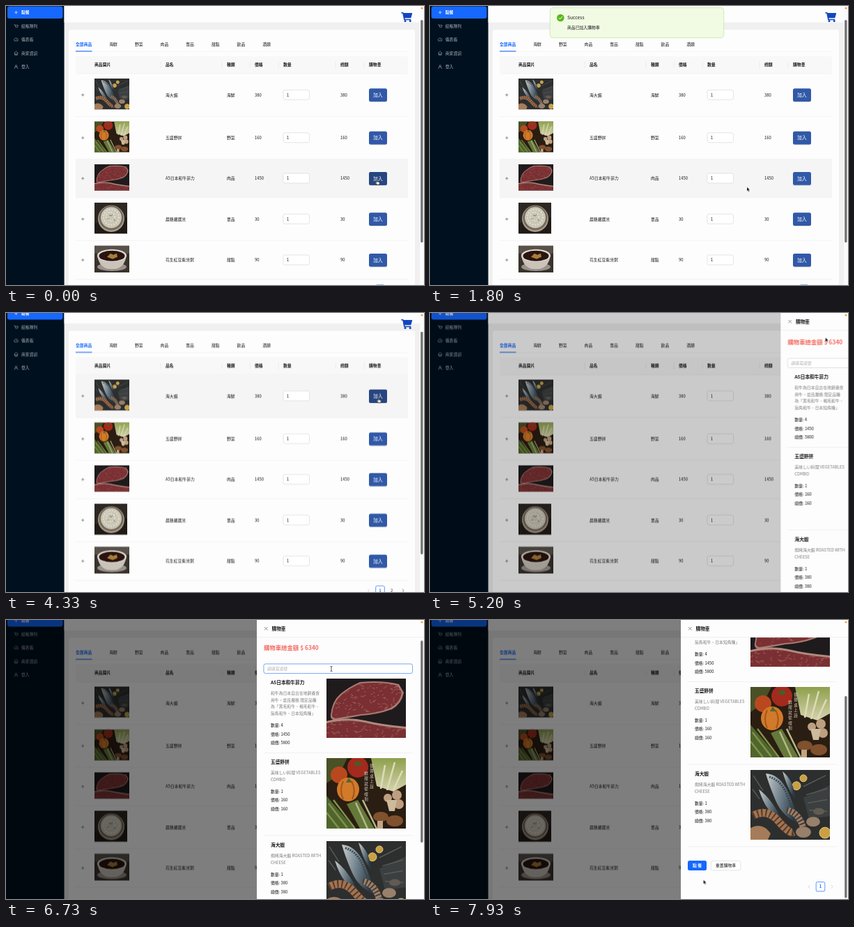
An HTML page that plays this animation: 600x400 px, repeating every 8000 ms.

```html
<!DOCTYPE html>
<html lang="zh-Hant">
<head>
<meta charset="utf-8">
<title>點餐</title>
<style>
html, body { margin: 0; width: 100%; height: 100%; overflow: hidden; background: #f0f0f0; }
svg { display: block; }
#stage { width: 100vw; height: 100vh; }
text { font-family: 'Noto Sans CJK TC', 'Noto Sans CJK JP', 'Noto Sans CJK', 'Open Sans', sans-serif; }
.soft { filter: blur(.6px); }
.move { animation: 8s linear infinite; }
.flip { animation: 8s step-end infinite; opacity: 0; }

.page { animation-name: page; }
@keyframes page { 0%, 24.5% { transform: none; } 28%, 100% { transform: translateY(-8.5px); } }
.pageThumb { animation-name: pageThumb; }
@keyframes pageThumb { 0%, 24.5% { transform: none; } 28%, 100% { transform: translateY(6.5px); } }

.row1 { animation-name: row1; }
@keyframes row1 { 0% { opacity: 0; } 49.5% { opacity: 1; } 59%, 100% { opacity: 0; } }
.row2 { animation-name: row2; }
@keyframes row2 { 0% { opacity: 0; } 36.5% { opacity: 1; } 49.5%, 100% { opacity: 0; } }
.row3 { animation-name: row3; }
@keyframes row3 { 0% { opacity: 1; } 26% { opacity: 0; } 33.5% { opacity: 1; } 36.5%, 100% { opacity: 0; } }
.row4 { animation-name: row4; }
@keyframes row4 { 0% { opacity: 0; } 26% { opacity: 1; } 33.5%, 100% { opacity: 0; } }
.press1 { animation-name: press1; }
@keyframes press1 { 0% { opacity: 0; } 50.5% { opacity: 1; } 57.5%, 100% { opacity: 0; } }
.press2 { animation-name: press2; }
@keyframes press2 { 0% { opacity: 0; } 37.5% { opacity: 1; } 48%, 100% { opacity: 0; } }
.press3 { animation-name: press3; }
@keyframes press3 { 0% { opacity: 1; } 17.5%, 100% { opacity: 0; } }

.notice { animation-name: notice; }
@keyframes notice {
  0%, 11.7%, 27%, 40%, 51.5%, 56%, 64%, 100% { opacity: 0; transform: translateY(-14px); }
  13%, 26%, 41.5%, 50.5%, 57.5%, 63% { opacity: 1; transform: none; }
}
.mask { animation-name: mask; }
@keyframes mask { 0%, 64% { opacity: 0; } 66.5%, 100% { opacity: .5; } }
.drawer { animation-name: drawer; }
@keyframes drawer {
  0%, 64% { transform: translateX(252px); animation-timing-function: ease-out; }
  67.5%, 100% { transform: none; }
}
.cart { animation-name: cart; }
@keyframes cart {
  0%, 76% { transform: none; }
  78.5%, 88% { transform: translateY(-2px); animation-timing-function: ease-in-out; }
  95.5%, 100% { transform: translateY(-104px); }
}
.cartThumb { animation-name: cartThumb; }
@keyframes cartThumb {
  0%, 76% { transform: none; }
  78.5%, 88% { transform: translateY(1.5px); animation-timing-function: ease-in-out; }
  95.5%, 100% { transform: translateY(81px); }
}
.focus { animation-name: focus; }
@keyframes focus { 0% { opacity: 0; } 79.5%, 100% { opacity: 1; } }

.pointer { animation-name: pointer; }
@keyframes pointer {
  0%, 16% { transform: translate(532.5px, 249px); }
  18.5% { transform: translate(500px, 257px); }
  21.5%, 24% { transform: translate(455px, 259.5px); }
  28% { transform: translate(492px, 284px); }
  32.5% { transform: translate(520px, 256px); }
  35% { transform: translate(530px, 218px); }
  38%, 47% { transform: translate(532.5px, 181px); }
  51%, 56% { transform: translate(534.5px, 121.5px); }
  62%, 64.5% { transform: translate(573px, 14px); }
  70%, 72% { transform: translate(515px, 241px); }
  77.5%, 89% { transform: translate(467px, 70px); }
  94% { transform: translate(418px, 320px); }
  97.5%, 100% { transform: translate(392.5px, 372.5px); }
}
.hand { animation-name: hand; }
@keyframes hand {
  0%, 37.5%, 50.5%, 61% { opacity: 1; }
  17.5%, 48%, 57.5%, 65%, 100% { opacity: 0; }
}
.beam { animation-name: beam; }
@keyframes beam { 0%, 89.5%, 100% { opacity: 0; } 77% { opacity: 1; } }
.arrow { animation-name: arrow; }
@keyframes arrow {
  0%, 37.5%, 50.5%, 61%, 77% { opacity: 0; }
  17.5%, 48%, 57.5%, 65%, 89.5%, 100% { opacity: 1; }
}
</style>
</head>
<body>
<svg id="stage" viewBox="0 0 600 400" preserveAspectRatio="none">
<defs>
  <clipPath id="bodyClip"><rect x="360" y="25" width="240" height="375"/></clipPath>
  <clipPath id="steakClip">
    <path d="M8 51Q10 33 22 23T49 7Q80 4 102 10L108 20Q106 34 92 42Q72 50 50 51L13 57Q7 56 8 51z"/>
    <path d="M0 64Q30 57 55 63T114 72V85H0z"/>
  </clipPath>
  <linearGradient id="fish" x2="1" y2=".3">
    <stop stop-color="#c9cdcb"/><stop offset=".5" stop-color="#75858f"/><stop offset="1" stop-color="#2b3a45"/>
  </linearGradient>
  <linearGradient id="cabbage" x2="0" y2="1">
    <stop stop-color="#8da04c"/><stop offset="1" stop-color="#d6d3ae"/>
  </linearGradient>

  <symbol id="seafood" viewBox="0 0 114 101" preserveAspectRatio="none">
    <rect width="114" height="101" fill="#2d2e2e"/>
    <g class="soft">
      <path d="M76 40l38-18v45l-30 4z" fill="#3c3f40"/>
      <path d="M76 24l32-16M80 36l30-9M82 48l28-5M84 58l26 2M4 8l14 22M3 28l10 14" stroke="#565b5b" stroke-width="1.5"/>
      <g fill="#c9a043" stroke="#e0c87d"><circle cx="66" cy="23" r="6"/><circle cx="76" cy="12" r="5"/><circle cx="107" cy="91" r="8"/></g>
      <g fill="url(#fish)">
        <path d="M22 5Q42 6 54 32T70 78Q46 68 36 44T22 5z"/>
        <path d="M46 2Q63 16 64 42Q54 30 46 2z"/>
        <path d="M12 28Q31 42 46 74Q23 64 12 28z"/>
      </g>
      <path d="M27 10Q46 16 54 40T66 70" fill="none" stroke="#384853" stroke-width="3" stroke-dasharray="2 1.500"/>
      <path d="M4 66Q24 55 40 74T62 90" fill="none" stroke="#a17450" stroke-width="11"/>
      <path d="M4 66Q24 55 40 74T62 90" fill="none" stroke="#58392a" stroke-width="11" stroke-dasharray="2 4"/>
      <path d="M52 58Q70 62 76 85" fill="none" stroke="#9b8069" stroke-width="9"/>
      <path d="M52 58Q70 62 76 85" fill="none" stroke="#493a34" stroke-width="9" stroke-dasharray="2 3"/>
      <path d="M0 84q17-9 29 8l-4 9H0z" fill="#a57c59"/>
      <g fill="#98806a"><ellipse cx="76" cy="90" rx="11" ry="8"/><ellipse cx="90" cy="75" rx="10" ry="7"/><ellipse cx="98" cy="60" rx="8" ry="5" fill="#625a51"/></g>
    </g>
  </symbol>

  <symbol id="greens" viewBox="0 0 114 101" preserveAspectRatio="none">
    <rect width="114" height="101" fill="#2a1d12"/>
    <g class="soft">
      <path d="M0 0h30L18 24 0 36z" fill="#4a5126"/>
      <path d="M64 0h50v38L96 48 72 40z" fill="url(#cabbage)"/>
      <path d="M78 44l6-34M87 46l11-40M96 46l13-28" stroke="#dddbb9" stroke-width="2.500"/>
      <circle cx="45" cy="13" r="15" fill="#a32a1c"/><path d="M38 8l8-4 6 5-7 3z" fill="#4a5c29"/>
      <circle cx="18" cy="24" r="12" fill="#b9481f"/>
      <ellipse cx="31" cy="45" rx="16" ry="17" fill="#d17a29"/>
      <path d="M24 33q-6 13 0 26M36 33q7 13 1 26" fill="none" stroke="#a3551e" stroke-width="2"/>
      <path d="M28 35l4-7 5 7z" fill="#58652f"/>
      <path d="M0 54l40 47H0z" fill="#50652d"/>
      <path d="M3 65l27 35M0 78l18 23M10 60l31 41" stroke="#7f9349" stroke-width="2.500"/>
      <path d="M45 60l24 41H48L29 66z" fill="#64793a"/>
      <path d="M52 60l20 41M42 64l17 37" stroke="#b6b78a" stroke-width="2.500"/>
      <g fill="#bd9f80"><circle cx="88" cy="57" r="6"/><circle cx="101" cy="53" r="7"/><circle cx="104" cy="66" r="7"/><path d="M86 60h15l-3 16h-8z" fill="#cdb99c"/></g>
      <g fill="#80512f"><ellipse cx="78" cy="84" rx="11" ry="7"/><ellipse cx="98" cy="90" rx="12" ry="8"/><path d="M73 90h8v11h-8z" fill="#c2a480"/></g>
    </g>
  </symbol>

  <symbol id="beef" viewBox="0 0 114 85" preserveAspectRatio="none">
    <rect width="114" height="85" fill="#1f1b1d"/>
    <g class="soft">
      <path d="M6 52Q8 32 20 22T48 5Q80 2 104 8L111 20Q108 36 94 44Q72 52 50 53L12 60Q5 58 6 52z" fill="#a97a72"/>
      <path d="M0 61Q30 54 55 60T114 69V85H0z" fill="#b08a80"/>
    </g>
    <g clip-path="url(#steakClip)">
      <rect width="114" height="85" fill="#7a3032"/>
      <path id="marbling" fill="none" stroke="#b0716c" stroke-width=".7"/>
    </g>
  </symbol>

  <symbol id="rice" viewBox="0 0 47 44.5" preserveAspectRatio="none">
    <rect width="47" height="44.5" fill="#2c2722"/>
    <path d="M0 30l47-9v23.5H0z" fill="#201b17"/>
    <g class="soft">
      <circle cx="24" cy="23" r="19" fill="#a79c8b"/>
      <circle cx="24" cy="22" r="17.5" fill="#75685a"/>
      <circle cx="24" cy="21.5" r="15" fill="#c9c6b6"/>
      <g fill="none" stroke="#e3e0d2" stroke-width="2" stroke-dasharray="2 2"><circle cx="24" cy="21" r="11"/><circle cx="23" cy="20" r="6"/></g>
      <path d="M21 18l3 1 2-2M18 24l3-1M27 24l3 2" stroke="#89865f" fill="none"/>
    </g>
  </symbol>

  <symbol id="soup" viewBox="0 0 50 38" preserveAspectRatio="none">
    <rect width="50" height="38" fill="#39322d"/>
    <g class="soft">
      <path d="M0 0h50v11H0z" fill="#57514a"/>
      <ellipse cx="25" cy="30" rx="21" ry="6" fill="#98918a"/>
      <path d="M4 14h42q-3 17-16 19H20Q7 31 4 14z" fill="#c9c3ba"/>
      <ellipse cx="25" cy="14" rx="21" ry="9" fill="#ddd8cf"/>
      <ellipse cx="25" cy="14.5" rx="18.5" ry="7.5" fill="#29140f"/>
      <path d="M18 16l5-5 4 2 5-2 1 5-7 3z" fill="#a97d3a"/>
    </g>
  </symbol>
</defs>
</svg>
<script>
const EM = 5.85, SIDE = 83.57, BLUE = '#1668ff', INK = '#181818';

const text = (x, y, str, { size = EM, fill = INK, weight = 500, extra = '' } = {}) =>
  `<text x="${x}" y="${y + size * .37}" font-size="${size}" fill="${fill}" font-weight="${weight}" ${extra}>${str}</text>`;
const rect = (x, y, w, h, fill, extra = '') =>
  `<rect x="${x}" y="${y}" width="${w}" height="${h}" fill="${fill}" ${extra}/>`;
const line = (d, stroke, width = .6) =>
  `<path d="${d}" fill="none" stroke="${stroke}" stroke-width="${width}"/>`;
const group = (cls, ...parts) => `<g class="${cls}">${parts.join('')}</g>`;
const photo = (id, x, y, w, h) => `<use href="#${id}" x="${x}" y="${y}" width="${w}" height="${h}"/>`;
const middle = 'text-anchor="middle"';

// Short random veins of fat, the same on every load.
function marbling() {
  let seed = 7;
  const random = span => (seed = seed * 16807 % 2147483647) / 2147483647 * span;
  return Array.from({ length: 260 }, () =>
    `M${random(114)} ${random(85)}q${random(3)} ${random(4) - 2} ${random(5)} ${random(5) - 3}`).join('');
}

function sidebar() {
  const icons = ['M-2.4 0h4.8M0-2.4v4.8',
    'M-3-2h1.2l1 3.4h3l.7-2.5h-4.4M-.5 2.6h.4M1.8 2.6h.4',
    'M-2.5 1.8a2.8 2.8 0 1 1 5 0zM0 .5l1-1.4',
    'M-3 0l3-2.7L3 0M-2-.6v3.1h4v-3.1M-.5 2.5v-1.6h1v1.6',
    'M-1.3-1.2a1.3 1.3 0 1 0 2.6 0a1.3 1.3 0 1 0-2.6 0M-2.5 2.8q0-2.6 2.5-2.6t2.5 2.6'];
  return rect(2, .5, 79.5, 17.5, BLUE, 'rx="3"') +
    ['點餐', '結帳隊列', '儀表板', '商家資訊', '登入'].map((label, i) => {
      const y = 9.2 + i * 19.5, fill = i ? '#a9b0b7' : '#fff';
      return `<g transform="translate(14.5 ${y})">${line(icons[i], fill)}</g>` +
        text(22, y, label, { fill, weight: i ? 400 : 700 });
    }).join('');
}

function pager(y, xs, hasNext) {
  const [prev, first, second, next] = xs;
  return line(`M${prev + 1.3} ${y - 2.2}l-2.4 2.2 2.4 2.2`, '#bbb') +
    rect(first - 6.3, y - 6.7, 12.6, 13.4, '#fff', `rx="2" stroke="${BLUE}" stroke-width=".7"`) +
    text(first, y, 1, { fill: BLUE, weight: 700, extra: middle }) +
    (hasNext ? text(second, y, 2, { extra: middle }) : '') +
    line(`M${next - 1.2} ${y - 2.2}l2.4 2.2-2.4 2.2`, hasNext ? '#333' : '#bbb');
}

function tableRow([id, name, kind, price, top, height, y, w], i) {
  const button = fill => rect(521, y - 9.3, 26, 18.8, fill, 'rx="2.5"');
  return (i < 4 ? rect(100, top, 477, height, '#f5f5f5', `class="flip row${i + 1}"`) : '') +
    line(`M100 ${top + height}H577`, '#ebebeb') +
    line(`M108 ${y}h4.4M110.2 ${y - 2.2}v4.4`, '#555') +
    photo(id, 127, top + 7, w, height - 17) +
    text(229, y, name) + text(317, y, kind) + text(357, y, price) +
    rect(398, y - 7.2, 37.5, 14, '#fff', 'rx="2.5" stroke="#d4d4d4" stroke-width=".6"') +
    text(403, y, 1) + text(480, y, price) +
    rect(521, y - 8.3, 26, 18.8, '#00000022', 'rx="2.5"') + button('#3159a8') +
    (i < 3 ? group(`flip press${i + 1}`, button('#274680')) : '') +
    text(534, y, '加入', { size: 6.7, fill: '#fff', extra: middle });
}

function shop() {
  const tabs = ['全部商品', '海鮮', '野菜', '肉品', '單品', '甜點', '飲品', '酒類'];
  const heads = [[127, '商品圖片'], [229, '品名'], [317, '種類'], [357, '價格'], [398, '數量'], [480, '總額'], [521, '購物車']];
  const rows = [
    ['seafood', '海大蝦', '海鮮', 380, 97, 61.4, 127.5, 50],
    ['greens', '五盛野拼', '野菜', 160, 158.4, 61.4, 189, 50],
    ['beef', 'A5日本和牛菲力', '肉品', 1450, 219.8, 55, 247.2, 50],
    ['rice', '晨穗嚴選米', '單品', 30, 274.8, 61.6, 305.5, 47],
    ['soup', '花生紅豆紫米粥', '甜點', 90, 336.6, 55.4, 364.2, 50]];
  return rect(SIDE, -10, 594 - SIDE, 33.5, '#fdfdfd') +
    rect(90, 34, 497, 400, '#fdfdfd', 'rx="3"') +
    line('M100 65.2H577', '#ededed') +
    tabs.map((tab, i) => text(i ? 111.6 + i * 36.67 : 100, 55.2, tab, i ? {} : { fill: BLUE, weight: 700 })).join('') +
    rect(100, 64.3, 23.5, 1.1, BLUE) +
    rect(100, 72, 477, 25, '#f8f8f8', 'rx="3"') + line('M100 97H577', '#ebebeb') +
    heads.map(([x, label], i) => text(x, 84.3, label, { weight: 700 }) +
      (i ? line(`M${x - 6.8} 79.5v9.5`, '#e6e6e6') : '')).join('') +
    rows.map(tableRow).join('') +
    pager(406.5, [520.5, 537, 553.5, 570], true);
}

function cartIcon() {
  return '<g fill="#1247be"><path d="M567.3 9h2.3q1 0 1.2 1H582.5q.8 0 .6.9l-1.6 5.6q-.2.8-1 .8H572.4l.3 1.5h8.6v1.4H572q-.8 0-.9-.8L569.2 10.4h-1.9z"/>' +
    '<circle cx="573" cy="21.6" r="1.5"/><circle cx="580.2" cy="21.6" r="1.5"/></g>';
}

function notice() {
  return rect(172.3, 2.5, 249.4, 43, '#f1fae3', 'rx="4" stroke="#bfe59b" stroke-width=".7"') +
    '<circle cx="187.3" cy="17" r="5.3" fill="#58b81f"/>' + line('M184.9 17l1.7 1.9 3.2-3.8', '#fff', 1) +
    text(197, 17, 'Success', { size: 6.7 }) + text(197, 31.2, '商品已加入購物車');
}

function cartItem({ id, top, photoH, end, name, about, count, price }) {
  const facts = [`數量: ${count}`, `價格: ${price}`, `總價: ${count * price}`];
  const factTop = top + 28.1 + about.length * 9.7;
  return text(380, top + 5.4, name, { size: 6.7, weight: 700 }) +
    about.map((row, i) => text(380, top + 20.8 + i * 9.7, row, { fill: '#7d7d7d', weight: 400 })).join('') +
    facts.map((fact, i) => text(380, factTop + i * 12.5, fact)).join('') +
    photo(id, 460, top, 114, photoH) + line(`M370 ${end}H584`, '#e9e9e9');
}

function drawer() {
  const items = [
    { id: 'beef', top: 86, photoH: 85, end: 192.5, name: 'A5日本和牛菲力', count: 4, price: 1450,
      about: ['和牛為日本自古在地飼養食', '用牛，並且嚴格 限定品種', '為「黑毛和牛、褐毛和牛、', '無角和牛、日本短角種」'] },
    { id: 'greens', top: 200, photoH: 101, end: 311, name: '五盛野拼', count: 1, price: 160,
      about: ['美味しい料理 VEGETABLES', 'COMBO'] },
    { id: 'seafood', top: 319, photoH: 100, end: 429, name: '海大蝦', count: 1, price: 380,
      about: ['焗烤海大蝦 ROASTED WITH', 'CHEESE'] }];
  const column = (x, y, str) => [...str].map((ch, i) =>
    text(x, y + i * 7.4, ch, { size: 5.6, fill: '#ddd6ca', weight: 400, extra: middle })).join('');
  const field = (stroke, extra = '') =>
    rect(370, 65, 213.5, 13.5, '#fff', `rx="2.5" stroke="${stroke}" stroke-width=".7" ${extra}`);
  const content = group('move cart',
    text(370, 42.3, '購物車總金額 $ 6340', { size: 8.4, fill: '#f36c62', weight: 700 }),
    field('#d4d4d4'),
    field('#4f8fff', 'class="flip focus"'),
    text(375, 71.8, '請填寫桌號', { fill: '#b0b0b0', weight: 400 }),
    items.map(cartItem).join(''),
    column(525, 211, '餐餐桌上蔬'), column(517, 222, '鮮甜就從嚐到'),
    rect(370, 449, 27, 14, BLUE, 'rx="2.5"'), text(383.5, 456, '點 餐', { fill: '#fff', weight: 700, extra: middle }),
    rect(403.3, 449.3, 42.6, 13.6, '#fff', 'rx="2.5" stroke="#d4d4d4" stroke-width=".6"'),
    text(424.6, 456, '重置購物車', { extra: middle }),
    pager(486.3, [544, 560.5, 0, 577], false));
  return rect(360, 0, 240, 400, '#fdfdfd') +
    `<g clip-path="url(#bodyClip)">${content}</g>` +
    line('M360 24.7H600', '#e9e9e9') + line('M371 10l4.6 4.6M375.6 10l-4.6 4.6', '#666', .7) +
    text(381.5, 12.3, '購物車', { size: 6.7, weight: 700 }) +
    rect(595.2, 28, 3.3, 289.5, '#707070', 'rx="1.6" class="move cartThumb"');
}

function pointer() {
  const shape = (cls, d, fill, stroke, width) =>
    `<path class="flip ${cls}" d="${d}" fill="${fill}" stroke="${stroke}" stroke-width="${width}"/>`;
  return shape('arrow', 'M0 0v6l1.4-1.2 1 2.2 1-.5-1-2.1h1.9z', '#000', '#fff', .4) +
    shape('hand', 'M-.6.4q.6-.9 1.2 0v2.4l2.6.6q.8.3.7 1.2l-.5 2.6h-3.4l-2.2-2.8q-.2-.9.7-.8l.9.7z', '#fff', '#000', .6) +
    shape('beam', 'M-1.5-3.5q1.5 0 1.5.8v5.4q0 .8-1.5.8M1.5-3.5q-1.5 0-1.5.8M0 2.7q0 .8 1.5.8', 'none', '#111', .7);
}

document.getElementById('marbling').setAttribute('d', marbling());
document.getElementById('stage').insertAdjacentHTML('beforeend', [
  rect(0, 0, 600, 400, '#f0f0f0'),
  rect(0, 0, SIDE, 400, '#00101f'),
  group('move page', sidebar(), shop()),
  rect(594, 0, 6, 400, '#fafafa'),
  rect(595.2, 20, 3.3, 319, '#707070', 'rx="1.6" class="move pageThumb"'),
  cartIcon(),
  group('move notice', notice()),
  rect(0, 0, 600, 400, '#000', 'class="move mask"'),
  group('move drawer', drawer()),
  '<circle cx="597" cy="3.2" r="1.4" fill="#f29a38"/>',
  group('move pointer', pointer())
].join(''));
</script>
</body>
</html>
```
